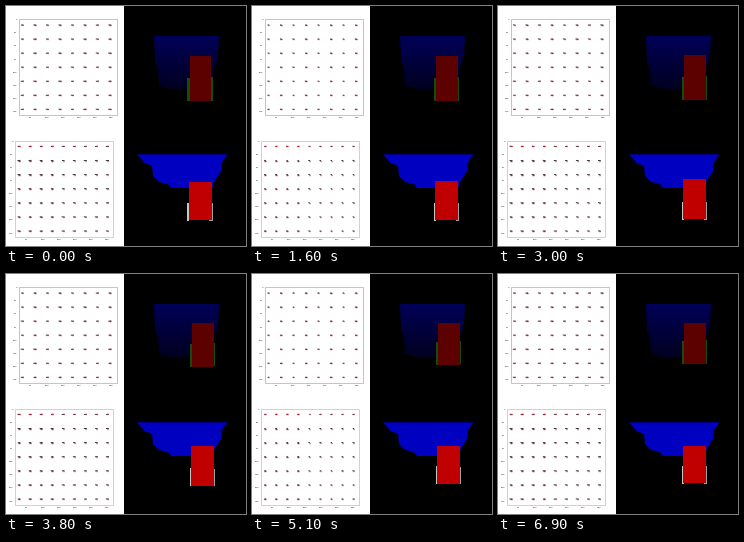
These frames come from a looping animation (240 px wide and 240 px high, 7 s). A matplotlib script:

```python
import numpy as np
import matplotlib.pyplot as plt
from matplotlib.animation import FuncAnimation
from matplotlib.collections import LineCollection
from matplotlib.patches import Polygon, Rectangle

SIZE, FRAMES, STEP = 240, 70, 100
PX = 0.72  # points per pixel at 100 dpi

plt.rcParams["font.family"] = "DejaVu Sans"
fig = plt.figure(figsize=(2.4, 2.4), dpi=100, facecolor="white")
ax = fig.add_axes([0, 0, 1, 1])
ax.axis("off")


def rect(color, z, bounds=(0, 0, 1, 1)):
    return ax.add_patch(Rectangle(bounds[:2], *bounds[2:], fc=color, lw=0,
                                  zorder=z))


def shape(points, color):
    return ax.add_patch(Polygon(points, fc=color, lw=0, zorder=2))


def place(patch, x0, y0, x1, y1):
    patch.set_bounds(x0, y0, x1 - x0, y1 - y0)


def ease(i, start, end):
    """Smooth step from 0 to 1 between two frame numbers."""
    t = np.clip((i - start) / (end - start), 0, 1)
    return t * t * (3 - 2 * t)


def plot_frame(x, y, width, height, color):
    ax.add_patch(Rectangle((x, y), width, height, fc="none", ec=color,
                           lw=0.6 * PX, zorder=2))
    style = dict(size=1.7, color="#222222", va="center")
    for k in range(6):
        ax.text(x + 12.2 + 16.1 * k, y + height + 2.8, str(50 * (k + 1)),
                ha="center", **style)
    for k in range(8):
        ax.text(x - 1.4, y + 0.8 + 13.1 * k, str(25 * k), ha="right", **style)


class FlowGrid:
    """Grid of red points, each with a short dark flow arrow."""

    def __init__(self, xs, ys, seed):
        gx, gy = np.meshgrid(xs, ys)
        self.pts = np.column_stack([gx.ravel(), gy.ravel()])
        rng = np.random.default_rng(seed)
        self.phase = rng.uniform(0, 2 * np.pi, self.pts.shape)
        self.rate = rng.integers(3, 12, self.pts.shape)
        self.dark = LineCollection([], colors="#303030", linewidths=0.95 * PX,
                                   zorder=3)
        self.red = LineCollection([], colors="#c01c30", linewidths=1.35 * PX,
                                  zorder=4)
        ax.add_collection(self.dark)
        ax.add_collection(self.red)

    def update(self, i):
        turn = 2 * np.pi * i / FRAMES
        reach = 1.1 + 0.3 * np.cos(2 * turn)
        noise = 0.15 * np.sin(self.phase + self.rate * turn)
        flow = reach * np.array([1, 0.15 * np.sin(turn)]) + noise
        self.dark.set_segments(np.stack([self.pts - flow, self.pts + flow], 1))
        half = np.array([0.7, 0])
        self.red.set_segments(np.stack([self.pts - half, self.pts + half], 1))


plot_frame(12.5, 13, 98, 96, "#a0a0a0")
plot_frame(8.5, 134.5, 98, 96, "#b4b4b4")
grids = [FlowGrid(16.3 + 12.5 * np.arange(8), 19 + 14.05 * np.arange(7), 4),
         FlowGrid(13 + 11.05 * np.arange(9), 140.4 + 14.1 * np.arange(7), 9)]

rect("black", 1, (118, 0, 122, 240))

# Dim surface in the upper view, fading towards its lower edge
fade = np.zeros((60, 1, 3))
fade[:, 0, 2] = np.linspace(0.34, 0.1, 60)
shade = ax.imshow(fade, extent=(140, 220, 90, 30), aspect="auto",
                  interpolation="bilinear", zorder=2)
dim = shape([(148, 30), (213, 30), (212, 52), (208, 62), (206, 83),
             (165, 83), (153, 80), (152, 62), (149, 56)], "none")
shade.set_clip_path(dim)

shape([(131, 148.3), (221.5, 148.3), (216, 156), (215, 165), (208, 176),
       (206, 182), (165, 182), (162, 178), (153, 176), (147, 170),
       (146, 159.5), (139, 157.5)], "#0000c0")

green = [rect("#144c09", 3) for _ in range(2)]
white = [rect(color, 3) for color in ("#c4c8c4", "#a0a0a0")]
dark_box = rect("#5c0000", 4)
red_box = rect("#c00000", 4)

ax.set_xlim(0, SIZE)
ax.set_ylim(SIZE, 0)
ax.set_aspect("auto")


def update(i):
    for grid in grids:
        grid.update(i)

    slide = 2.5 * ease(i, 10, 32)
    rise = ease(i, 0, 50)
    lift = 5 * ease(i, 18, 60)

    # Upper view
    x, top, low = 183.6 + slide, 50.4 - 1.4 * rise, 95 - lift
    place(dark_box, x, top, x + 21.5, low)
    place(green[0], x - 2.3, low - 23, x + 0.5, low)
    place(green[1], x + 21, low - 24, x + 23, low - 0.5)

    # Lower view
    x, top, low = 182.9 + slide, 175.5 - 3.8 * rise, 214 - lift
    place(red_box, x, top, x + 23, low)
    place(white[0], x - 1.7, low - 17.5, x + 0.5, low + 0.5)
    place(white[1], x + 20.5, low - 17, x + 23.7, low + 0.5)
    return []


anim = FuncAnimation(fig, update, frames=FRAMES, interval=STEP,
                     repeat=True, repeat_delay=0, init_func=lambda: update(0))
plt.show()
```
